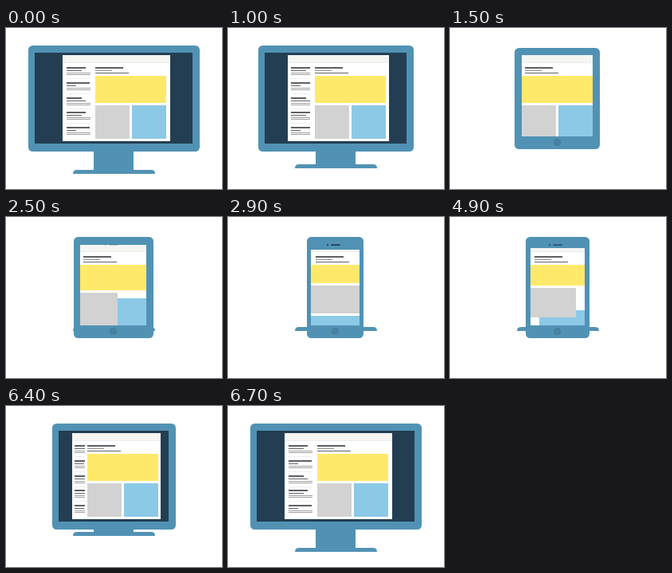
Recreate the animation shown at these times as an HTML page. Size 271 by 202 pixels, loop 7700 ms.

```html
<!DOCTYPE html>
<html lang="en">
<head>
<meta charset="utf-8">
<title>Responsive layout</title>
<style>
  html, body { margin: 0; width: 100%; height: 100%; overflow: hidden; background: #fff; }
  svg { display: block; width: 100vw; height: 100vh; }
</style>
</head>
<body>
<svg viewBox="0 0 271 202">
  <defs>
    <clipPath id="pageClip"><rect id="pageClipBox"/></clipPath>
    <clipPath id="sideClip"><rect id="sideClipBox"/></clipPath>
  </defs>
  <g id="stand" fill="#5192b4">
    <rect x="110" y="140" width="50" height="39"/>
    <path d="M84 183 q0 -5 5 -5 h93 q5 0 5 5 z"/>
  </g>
  <rect id="body" rx="5.5" fill="#5192b4"/>
  <rect id="screen" fill="#233e53"/>
  <g clip-path="url(#pageClip)" shape-rendering="crispEdges">
    <rect id="page" fill="#fff"/>
    <rect x="0" y="34" width="271" height="9" fill="#f5f5f2"/>
    <rect x="0" y="43" width="271" height="1" fill="#e8f0f4"/>
    <g clip-path="url(#sideClip)"><g id="side"></g></g>
    <g id="heading">
      <rect y="49" width="35" height="2" fill="#5d6065"/>
      <rect y="53" width="21" height="1" fill="#8b8b8b"/>
      <rect y="56" width="42" height="1" fill="#5f6165"/>
    </g>
    <rect id="yellow" fill="#ffe96b"/>
    <rect id="blue" fill="#8cc9e6"/>
    <rect id="gray" fill="#d2d2d2"/>
  </g>
  <g id="button">
    <circle cx="134.5" cy="143.5" r="4" fill="#4b88a8" stroke="#41748f"/>
    <rect x="133" y="142" width="3" height="3" rx=".7" fill="none" stroke="#41748f" stroke-width=".6"/>
  </g>
  <g id="speaker" fill="#2b4a5f">
    <circle cx="125" cy="35" r="1.2"/>
    <rect x="129" y="34" width="12" height="2" rx="1"/>
  </g>
</svg>
<script>
const el = id => document.getElementById(id);

// Boxes are [x, y, width, height]
const desktop = {
  body: [28, 22, 215, 133], screen: [36, 31, 198, 114], page: [71, 34, 135, 108],
  yellow: [112, 60, 89, 34], gray: [112, 97, 43, 42], blue: [158, 97, 43, 42],
  side: [76, 30], heading: [112], lift: [0], button: [0], speaker: [0]
};
const narrow = {
  ...desktop,
  body: [58, 22, 155, 133], screen: [66, 31, 138, 114], page: [83, 34, 111, 108],
  yellow: [102, 60, 89, 34], gray: [102, 97, 43, 42], blue: [148, 97, 43, 42],
  side: [86, 13], heading: [102], lift: [20]
};
const tablet = {
  body: [81, 25, 107, 127], screen: [90, 34, 89, 102], page: [90, 34, 89, 102],
  yellow: [90, 60, 89, 34], gray: [90, 97, 43, 42], blue: [136, 97, 43, 42],
  side: [90, 0], heading: [94], lift: [40], button: [1], speaker: [0]
};
const phone = {
  ...tablet,
  body: [99, 25, 71, 127], screen: [104, 41, 61, 95], page: [104, 41, 61, 95],
  yellow: [104, 60, 61, 23], gray: [104, 86, 61, 35], blue: [104, 124, 61, 35],
  side: [104, 0], heading: [110], speaker: [1]
};

// Sidebar entries: widths of the two title lines
const entries = [[24, 19], [29, 12], [19, 24], [24, 19], [29, 12]];
const line = (y, w, h, color) => `<rect y="${y}" width="${w}" height="${h}" fill="${color}"/>`;
el('side').innerHTML = entries.map(([a, b], i) => {
  const y = 49 + Math.round(i * 18.75);
  return line(y, a, 2, '#5d6065') + line(y + 4, b, 1, '#5f6165') +
    line(y + 7, 30, 1, '#a0a0a0') + line(y + 9, 30, 1, '#a0a0a0') +
    (i < 4 ? line(y + 14, 30, 1, '#eeeeee') : '');
}).join('');

function mix(a, b, p) {
  const out = {};
  for (const key in a) out[key] = a[key].map((v, i) => v + (b[key][i] - v) * p);
  return out;
}

const shrink = p => p < .5 ? mix(desktop, narrow, p * 2) : mix(narrow, tablet, p * 2 - 1);

// Each transition advances in 100 ms steps, the first one visible at its start time
function stateAt(ms) {
  const progress = (start, steps) =>
    Math.max(0, Math.min(1, (Math.floor((ms - start) / 100) + 1) / steps));
  if (ms < 2500) return shrink(progress(1000, 6));
  if (ms < 4900) return mix(tablet, phone, progress(2500, 5));
  if (ms < 6200) return mix(phone, tablet, progress(4900, 4));
  return shrink(1 - progress(6200, 6));
}

function setBox(id, box) {
  ['x', 'y', 'width', 'height'].forEach((name, i) => el(id).setAttribute(name, Math.round(box[i])));
}
const move = (id, x, y) => el(id).setAttribute('transform', `translate(${Math.round(x)} ${Math.round(y)})`);

function render(ms) {
  const s = stateAt(ms);
  for (const id of ['body', 'screen', 'page', 'yellow', 'gray', 'blue']) setBox(id, s[id]);
  setBox('pageClipBox', s.page);
  setBox('sideClipBox', [s.side[0], 0, s.side[1], 202]);
  move('side', s.side[0], 0);
  move('heading', s.heading[0], 0);
  move('stand', 0, -s.lift[0]);
  el('button').setAttribute('opacity', s.button[0]);
  el('speaker').setAttribute('opacity', s.speaker[0]);
}

const start = performance.now();
function tick() {
  render((performance.now() - start) % 7700);
  requestAnimationFrame(tick);
}
tick();
</script>
</body>
</html>
```
